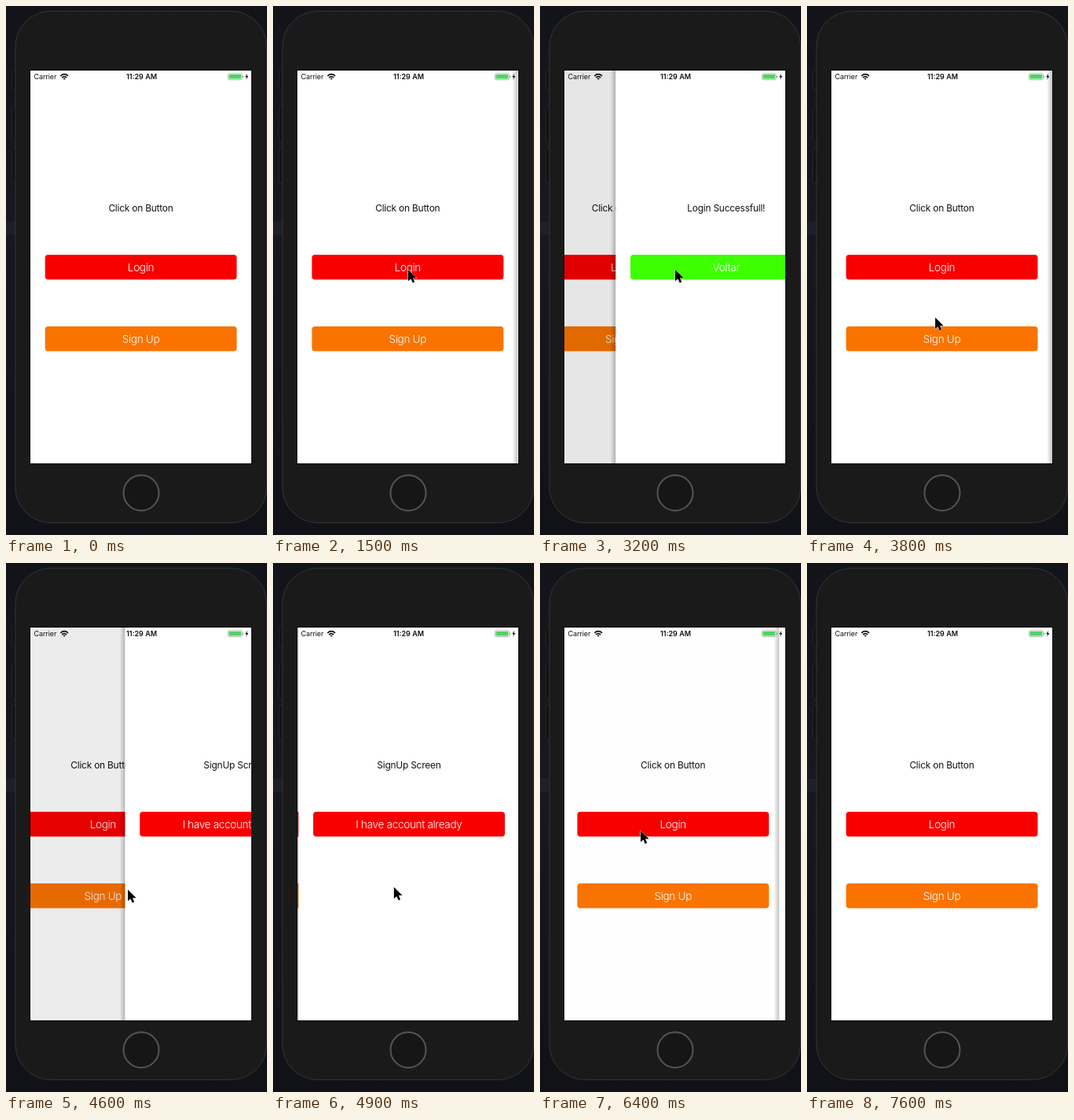
An HTML page for the animation above (8000 ms loop, 332 px wide and 672 px high).

```html
<!DOCTYPE html>
<html lang="en">
<head>
<meta charset="utf-8">
<title>Screen navigation</title>
<style>
  html, body { margin: 0; width: 100%; height: 100%; overflow: hidden; background: #14151c; }
  svg { display: block; width: 332px; height: 672px; font-family: Inter, Roboto, sans-serif; }
  .label { font-size: 11.9px; letter-spacing: -.2px; text-anchor: middle; fill: #111; }
  .title { font-size: 13.5px; letter-spacing: -.3px; font-weight: 300; text-anchor: middle; fill: #fff; }
  .status { font-size: 9px; fill: #111; }
</style>
</head>
<body>
<svg viewBox="0 0 332 672">
  <defs>
    <linearGradient id="back" x2="0" y2="1">
      <stop offset="0" stop-color="#13141a"/>
      <stop offset=".4" stop-color="#171820"/>
      <stop offset="1" stop-color="#111218"/>
    </linearGradient>
    <linearGradient id="edge">
      <stop offset="0" stop-color="#000" stop-opacity="0"/>
      <stop offset="1" stop-color="#000" stop-opacity=".24"/>
    </linearGradient>
    <clipPath id="screen"><rect x="31" y="82" width="281" height="499"/></clipPath>
  </defs>

  <rect width="332" height="672" fill="url(#back)"/>
  <rect y="274" width="13" height="17" fill="#1d1f29"/>
  <g fill="#131313" stroke="#292929" stroke-width=".8">
    <rect x="7.5" y="81" width="7" height="25" rx="1.5"/>
    <rect x="7.5" y="128.500" width="7" height="44" rx="1.5"/>
    <rect x="7.5" y="180.500" width="7" height="44" rx="1.500"/>
  </g>
  <rect x="12" y="6.500" width="319.500" height="650" rx="45" fill="#1a1a1a" stroke="#353535"/>
  <rect x="30" y="81" width="283" height="501" fill="#0c0c0c"/>
  <circle cx="172" cy="618.500" r="22.500" fill="#161616" stroke="#555" stroke-width="2"/>

  <g clip-path="url(#screen)">
    <g id="home"></g>
    <rect id="dim" x="31" y="82" width="281" height="499" opacity="0"/>
    <g id="pane">
      <rect x="24" y="82" width="7" height="499" fill="url(#edge)"/>
      <g id="login"></g>
      <g id="signup"></g>
    </g>
  </g>

  <text class="status" x="35.500" y="93" letter-spacing="-.1">Carrier</text>
  <text class="status" x="172.500" y="93" text-anchor="middle" font-weight="600">11:29 AM</text>
  <g fill="none" stroke="#111" stroke-width="1.700">
    <path d="M69.300 88.900Q74.200 84.500 79.100 88.900M71.200 91Q74.200 88.400 77.200 91"/>
    <path d="M72.700 92.200Q74.200 91 75.700 92.200L74.200 93.800Z" fill="#111" stroke="none"/>
  </g>
  <rect x="282.400" y="85.900" width="18" height="7.800" rx="1.800" fill="#fff" stroke="#999" stroke-width=".7"/>
  <rect x="283.500" y="87" width="15.800" height="5.600" rx=".8" fill="#4cd562"/>
  <rect x="301.200" y="88.500" width=".9" height="2.600" rx=".4" fill="#888"/>
  <path d="M307 85.800L304.200 90.200H306L305.200 93.800L308.300 89.100H306.400Z" fill="#111"/>

  <path id="cursor" d="M0 0V14.600L3.400 11.500L5.700 16.700L8.200 15.600L6 10.500H10.600Z"
    fill="#000" stroke="#fff" stroke-width="1" paint-order="stroke" stroke-linejoin="round"/>
</svg>
<script>
const LOOP = 8000, STEP = 100, WIDTH = 281;
const SPRING = 18.26, SETTLE = 750;
const RED = '#f80000', ORANGE = '#fa7300', GREEN = '#3dff00';
const $ = id => document.getElementById(id);

const button = (y, color, text) =>
  `<rect x="49.700" y="${y}" width="243.800" height="31.500" rx="4" fill="${color}"/>
   <text class="title" x="171.500" y="${y + 20.700}">${text}</text>`;

const page = (label, ...buttons) =>
  `<rect x="31" y="82" width="${WIDTH}" height="499" fill="#fff"/>
   <text class="label" x="171.500" y="261">${label}</text>${buttons.join('')}`;

$('home').innerHTML = page('Click on Button', button(316, RED, 'Login'), button(407, ORANGE, 'Sign Up'));
$('login').innerHTML = page('Login Successfull!', button(316, GREEN, 'Voltar'));
$('signup').innerHTML = page('SignUp Screen', button(316, RED, 'I have account already'));

const visits = [
  { page: 'login', push: 1496, pop: 3150 },
  { page: 'signup', push: 4495, pop: 6100 }
];

// time, x, y of the pointer tip
const pointer = [
  [400, 318, 90], [700, 228, 252], [1000, 172, 335], [3400, 172, 335],
  [4000, 160, 417], [4150, 149, 411], [4300, 155, 415], [4800, 155, 415],
  [5600, 128, 340], [6500, 128, 340], [7100, 123, 359], [7600, 123, 359]
];

// Critically damped spring from 0 to 1
function spring(ms) {
  if (ms <= 0) return 0;
  if (ms >= SETTLE) return 1;
  const u = SPRING * ms / 1000;
  return 1 - (1 + u) * Math.exp(-u);
}

function pointerAt(t) {
  const i = pointer.findIndex(k => k[0] > t);
  if (i < 1) return null;
  const [t0, x0, y0] = pointer[i - 1], [t1, x1, y1] = pointer[i];
  const k = (t - t0) / (t1 - t0), e = k * k * (3 - 2 * k);
  return [x0 + (x1 - x0) * e, y0 + (y1 - y0) * e];
}

const move = (el, x, y = 0) => el.setAttribute('transform', `translate(${x.toFixed(2)} ${y.toFixed(2)})`);
const show = (el, on) => el.setAttribute('visibility', on ? 'inherit' : 'hidden');

function draw(t) {
  const visit = t < visits[1].push ? visits[0] : visits[1];
  const p = spring(t - visit.push) - spring(t - visit.pop);
  for (const v of visits) show($(v.page), v === visit);
  $('pane').style.display = p > 0 ? '' : 'none';
  move($('home'), -.3 * WIDTH * p);
  move($('pane'), WIDTH * (1 - p));
  $('dim').setAttribute('opacity', .128 * p);

  const tip = pointerAt(t);
  show($('cursor'), tip);
  if (tip) move($('cursor'), ...tip);
}

let start;
function tick(now) {
  start ??= now;
  draw(Math.floor((now - start) % LOOP / STEP) * STEP);
  requestAnimationFrame(tick);
}
draw(0);
requestAnimationFrame(tick);
</script>
</body>
</html>
```
